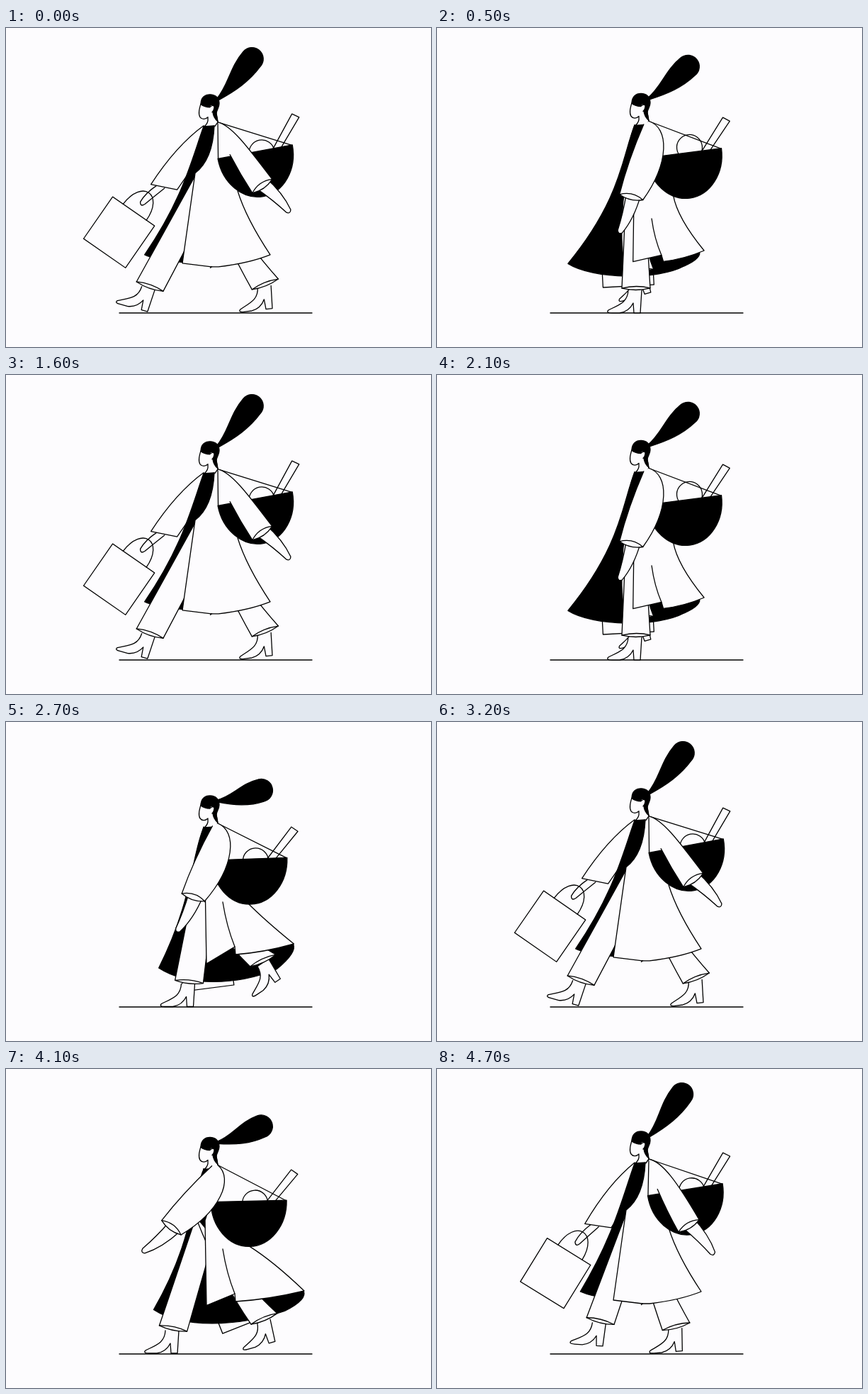
These frames come from a looping animation (600 by 450 pixels, 4800 ms). An HTML page with a canvas:

```html
<!DOCTYPE html>
<html lang="en">
<head>
<meta charset="utf-8">
<title>Walk cycle</title>
<style>
html, body { margin: 0; height: 100%; overflow: hidden; background: #fdfcfe; }
canvas { display: block; }
</style>
</head>
<body>
<canvas id="stage" width="600" height="450"></canvas>
<script>
const ctx = document.getElementById('stage').getContext('2d');
const PAPER = '#fdfcfe', INK = '#000';
const STEPS = 16, STEP_MS = 100;

// Heel path over one cycle: step, x, y, foot angle.
const heelPath = [
  [0, 196, 399, .26], [1, 238, 401, 0], [5, 283, 402, 0],
  [8, 372, 396, -.12], [12, 388, 354, -.75], [13, 298, 374, -.3], [16, 196, 399, .26]
];

const wave = (step, peak, period = STEPS) => Math.cos(2 * Math.PI * (step - peak) / period);
const clamp = v => Math.min(1, Math.max(0, v));
const mix = (a, b, f) => a.map((v, i) => v + (b[i] - v) * f);
const add = (a, x, y) => [a[0] + x, a[1] + y];
const turn = (x, y, r) => [x * Math.cos(r) - y * Math.sin(r), x * Math.sin(r) + y * Math.cos(r)];

function draw(d, fill) {
  const path = new Path2D(d);
  if (fill) {
    ctx.fillStyle = fill;
    ctx.fill(path);
  }
  ctx.stroke(path);
}

function local([x, y], angle, paint) {
  ctx.save();
  ctx.translate(x, y);
  ctx.rotate(angle);
  paint();
  ctx.restore();
}

// Everything the body parts share at one step.
function bodyAt(step) {
  const top = 95.25 + 8 * wave(step, 3, 8) - 2 * wave(step, 5, 8)
    + .75 * wave(step, 3, 4) + 2.8 * wave(step, 4, 4);
  return {
    step, top,
    bob: top - 93,
    swing: wave(step, .2),
    lag: wave(step, 1.5),
    wrap: clamp(.65 + .85 * wave(step, 8.5)),
    tail: 43 * Math.max(0, wave(step, 9, 14.8)),
    shoulder: [299, top + 39]
  };
}

function drawLeg(step, bob) {
  const i = heelPath.findLastIndex(k => k[0] <= step);
  const from = heelPath[i], to = heelPath[i + 1];
  const [, x, y, angle] = mix(from, to, (step - from[0]) / (to[0] - from[0]));
  local([x, y], angle, () =>
    draw('M-13-32C-14-15-25-12-41-4Q-45 0-36 0H-25Q-12-2-6-14L-5 0H4L6-32', PAPER));

  const cuff = add(turn(-2, -35, angle), x, y);
  const tilt = .7 * Math.atan2(280 - cuff[0], cuff[1] - 220);
  const side = turn(20, 0, tilt), sag = turn(0, 5, tilt);
  const a = add(cuff, -side[0], -side[1]), b = add(cuff, ...side);
  const hipL = [268, 206 + bob], hipR = [293, 236 + bob];
  const knee = (hip, end) => add(mix(hip, end, .6), 40 * Math.min(angle, 0), 0);
  draw(`M${hipL}Q${knee(hipL, a)} ${a}Q${add(cuff, ...sag)} ${b}Q${knee(hipR, b)} ${hipR}`, PAPER);
  draw(`M${a}Q${add(cuff, -sag[0], -sag[1])} ${b}`);
}

function drawBagArm({ swing, top }) {
  const shoulder = [279, top + 44];
  const reach = -.22 - .46 * swing;
  const hand = add(turn(0, 144, -reach), ...shoulder);
  const bagAngle = -.14 - 1.1 * reach;
  local(hand, bagAngle, () => draw('M-38 12H34V84H-38Z', PAPER));
  local(shoulder, -reach - .1, () => {
    draw('M-9 106Q-17 125-16 139Q-12 145-9 138Q-4 122 2 104', PAPER);
    draw('M0 0Q-17 45-17 110L18 96L19 63', PAPER);
  });
  local(hand, bagAngle, () => draw('M-20 12C-18-33 20-33 20 12'));
}

function drawHead({ top }) {
  local([288, top], 0, () => {
    draw('M-13 13C-15 20-17 27-14 32C-11 36-6 35-3 32V37Q-4 42-9 46H6L11 39L9 27L3 14Z', PAPER);
    draw('M-13 14C-13 4-7 0 0 0C8 0 13 5 13 13C13 19 9 22 9 27L11 38Q5 33 4 25Q8 19 4 15Q0 13 0 18Q-8 18-13 14Z', INK);
    draw('M1 17Q4 14 6 17Q6 22 3 25', PAPER);
  });
}

function drawHair({ step, top, lag }) {
  const lift = .59 + .2 * lag + .2 * wave(step, 6.7, 8), d = 60 + 18 * lift;
  local([298, top + 7], -lift, () =>
    draw(`M0-1C${d * .35}-1 ${d * .6}-16 ${d}-16A16 16 0 0 1 ${d} 16C${d * .65} 18 ${d * .35} 12 0 2Z`, INK));
}

// The coat opens as the near leg strides out and wraps round as it trails.
function coatPoints({ bob, wrap, tail, top }) {
  const at = (x, y, dx, dy, follow = 1) => [x + dx * wrap, y + dy * wrap + bob * follow];
  const hem = (x, y, dx, dy) => at(x, y, dx, dy, 1 - wrap);
  return {
    neck: [294, top + 44],
    lapel: at(292, 185, -2, 0),
    waist: at(267, 204, 14, 6),
    corner: at(249, 331, 34, -1),
    fold: hem(290, 336, 33, -19),
    foldTop: hem(290, 336, 16, -82),
    foldEnd: hem(300, 336, 24, -8),
    hem: add(hem(343, 331, 7, -6), tail * .5, 0),
    tip: add(hem(373, 319, 5, -6), tail, 0),
    back: add(at(339, 268, 0, 0), tail * .9, 0),
    top: add(at(327, 229, 8, 9), tail * .2, tail * .2)
  };
}

function drawLining(c, { step, bob, wrap, tail, top }) {
  const at = (x, y, dx, dy) => [x + dx * wrap, y + dy * wrap + bob];
  const corner = [199 + 17 * wave(step, 11.5), 319 + 17 * wrap + bob];
  const hem1 = add(corner, 20 + 20 * wrap, 9 + 17 * wrap), hem2 = at(263, 333, 62, 28);
  const rear = add(at(302, 330, 57, 8), tail * .8, 0);
  const tip = add(c.tip, -1 - 34 * (1 - wrap), -8 * (1 - wrap));
  draw(`M279 ${top + 45}C${at(262, 185, 0, -8)} ${at(250, 240, 14, 0)} ${corner}
    C${hem1} ${hem2} ${rear}Q${add(tip, 6, 12)} ${tip}L${c.fold}L${c.neck}Z`, INK);
}

function drawCoat(c) {
  draw(`M${c.neck}Q${c.lapel} ${c.waist}L${c.corner}L${c.fold}L${c.foldEnd}
    Q${c.hem} ${c.tip}Q${c.back} ${c.top}`, PAPER);
  draw(`M${c.foldTop}Q${add(mix(c.foldTop, c.fold, .5), -3, 3)} ${c.fold}`);
}

function drawBasket({ step, bob, lag, shoulder }) {
  const center = [347.5 + 5 * lag, 178 - 5 * lag + bob], angle = -.11 - .09 * lag;
  const ball = 3 - 10 * Math.exp(-((step - 5) ** 2) / 4);
  const rim = x => add(turn(x, 0, angle), ...center);
  local(center, angle, () => {
    draw(`M-9 ${ball}A18 18 0 0 1 27 ${ball}A18 18 0 0 1-9 ${ball}Z`);
    draw('M26 0L61-43L70-36.5L38 0');
    draw('M-53.5 0H53.5A53.5 64 0 0 1-53.5 0Z', INK);
  });
  draw(`M${rim(-53)}L${shoulder}L${rim(52)}`);
}

function drawNearArm({ swing, shoulder }) {
  const angle = .64 * swing - .03, back = Math.max(0, angle);
  local(shoulder, -angle, () => {
    local([0, 110], -.35 * angle, () => draw('M12-6Q13 28 3 52Q-2 56-4 50Q-4 25-8-3', PAPER));
    draw(`M0 0C${30 - 28 * back} ${2 + 20 * back} ${42 - 45 * back} 50 17 110Q0 117-17 110
      Q-16 ${60 + 30 * back} ${-6 - 10 * back} ${6 + 68 * back}`, PAPER);
    draw('M17 110Q0 101-17 110');
  });
}

function frame(now) {
  const step = Math.floor(now / STEP_MS) % STEPS;
  const body = bodyAt(step), coat = coatPoints(body);

  ctx.fillStyle = PAPER;
  ctx.fillRect(0, 0, 600, 450);
  ctx.strokeStyle = INK;
  ctx.lineWidth = 1.3;
  ctx.lineJoin = ctx.lineCap = 'round';
  draw('M160 402H432');

  drawBagArm(body);
  drawHead(body);
  drawLining(coat, body);
  drawLeg((step + STEPS / 2) % STEPS, body.bob);
  drawLeg(step, body.bob);
  drawCoat(coat);
  drawBasket(body);
  drawNearArm(body);
  drawHair(body);
  requestAnimationFrame(frame);
}
requestAnimationFrame(frame);
</script>
</body>
</html>
```
